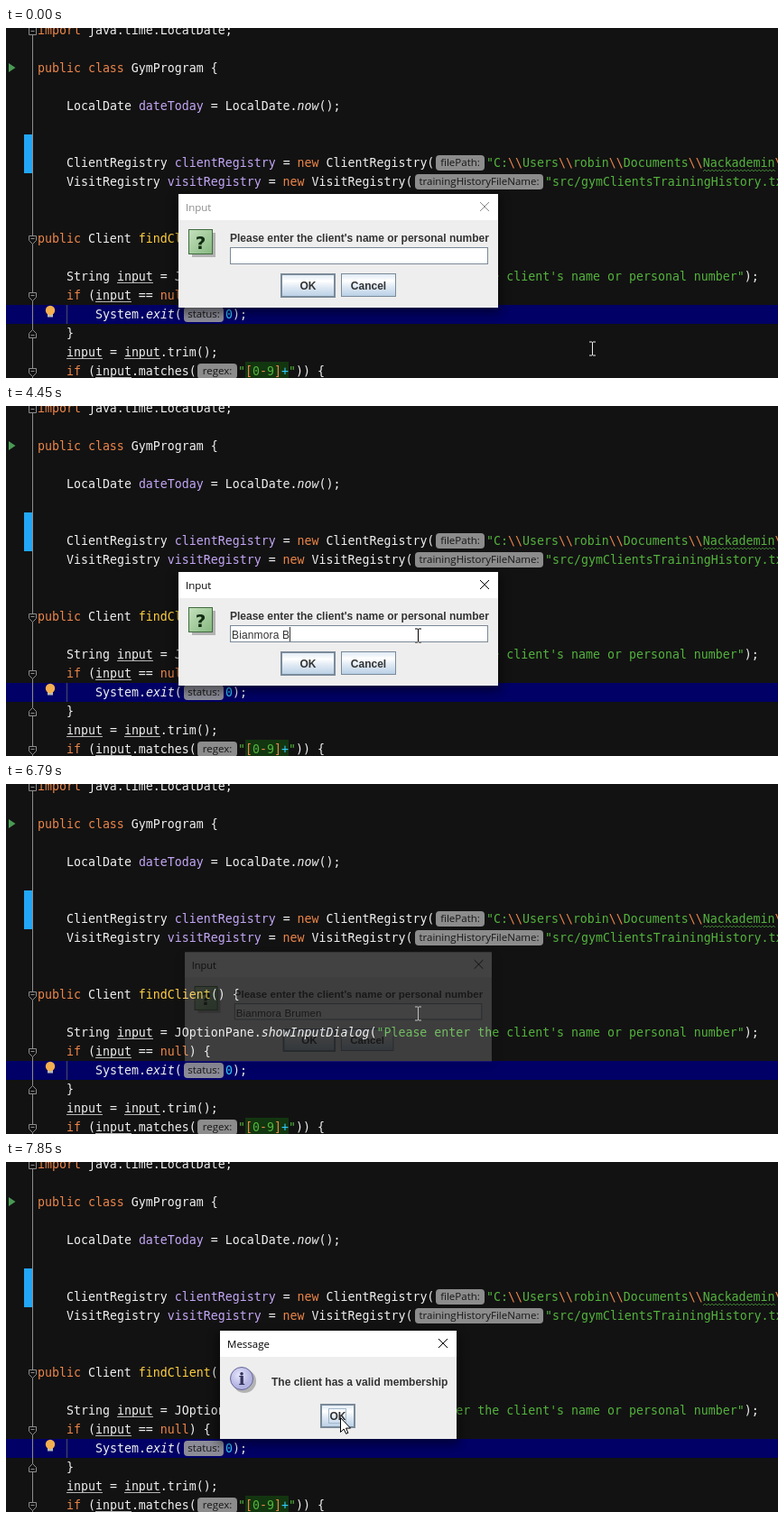
These frames come from a looping animation (855x388 px, 8 s). An HTML page:

```html
<!DOCTYPE html>
<html lang="en">
<head>
<meta charset="utf-8">
<title>Client lookup</title>
<style>
  html, body { margin: 0; width: 100%; height: 100%; overflow: hidden; background: #121212; }
  svg { display: block; isolation: isolate; }
  text { white-space: pre; }
  .code { font: 13.288px "DejaVu Sans Mono", monospace; fill: #f0f0f0; }
  .k { fill: #ed864a; }
  .s { fill: #54b33e; }
  .f { fill: #c3a6f5; }
  .m { fill: #ffcf40; }
  .n { fill: #33ccff; }
  .i { font-style: italic; }
  .hint { font: 11.5px "Open Sans", sans-serif; fill: #161616; }
  .title { font: 11.5px "Open Sans", sans-serif; }
  .bold { font: bold 12px "Liberation Sans", Arial, sans-serif; fill: #333; }
  .mid { text-anchor: middle; }
  .typed { font: 12px "Liberation Sans", Arial, sans-serif; letter-spacing: .15px; fill: #333; }
  .fold { fill: #121212; stroke: #8c8c8c; }
  .button { fill: url(#ocean); stroke: #7a8a99; }
  #beam { mix-blend-mode: difference; }
</style>
</head>
<body>
<svg width="855" height="388" viewBox="0 0 855 388">
  <defs>
    <linearGradient id="ocean" x2="0" y2="1">
      <stop offset="0" stop-color="#dde8f3"/>
      <stop offset=".3" stop-color="#fff"/>
      <stop offset=".55" stop-color="#e2ebf5"/>
      <stop offset="1" stop-color="#b8cfe5"/>
    </linearGradient>
    <linearGradient id="green" x2="1" y2="1">
      <stop offset="0" stop-color="#c4e0bc"/>
      <stop offset="1" stop-color="#86b880"/>
    </linearGradient>
    <radialGradient id="lilac" cx=".4" cy=".35">
      <stop offset="0" stop-color="#e6e6fc"/>
      <stop offset="1" stop-color="#b4b4e2"/>
    </radialGradient>
    <filter id="blur" x="-20%" y="-30%" width="140%" height="160%"><feGaussianBlur stdDeviation="6"/></filter>
  </defs>

  <rect width="855" height="388" fill="#121212"/>
  <rect y="307" width="855" height="21" fill="#000066"/>
  <path d="M67.5 307v21" stroke="#4a4a70"/>
  <rect x="265" y="370" width="48" height="18" fill="#12360f"/>
  <path d="M29.5 0v388" stroke="#8c8c8c"/>
  <rect x="20" y="118" width="9" height="43" fill="#22a7f7"/>
  <path d="M3 39l7.500 5l-7.500 5z" fill="#499c54"/>
  <g id="folds"></g>
  <path d="M46 317h6v3.500h-6z" fill="#b9b9b9"/>
  <circle cx="49" cy="313" r="5.200" fill="#f4af50"/>
  <g id="code"></g>

  <g id="ask">
    <rect x="188" y="187" width="360" height="129" opacity=".45" filter="url(#blur)"/>
    <rect x="191" y="184" width="354" height="126" fill="#eee"/>
    <rect x="191" y="184" width="354" height="29" fill="#fff"/>
    <g id="bar">
      <text class="title" x="199" y="203" fill="currentColor">Input</text>
      <path d="M525 193l10 10m0-10l-10 10" stroke="currentColor"/>
    </g>
    <path d="M206 227h26v27h-26z" fill="#999" opacity=".7"/>
    <rect x="202.500" y="223.500" width="26" height="27" fill="url(#green)" stroke="#3f6b3f"/>
    <text class="mid" x="215.500" y="245" font-family="DejaVu Sans, sans-serif" font-weight="bold" font-size="20" fill="#122c12">?</text>
    <text class="bold" x="248" y="237">Please enter the client's name or personal number</text>
    <rect x="248.500" y="243.500" width="285" height="18" fill="#fff" stroke="#7a8a99"/>
    <text class="typed" id="typed" x="250" y="258"></text>
    <rect id="caret" y="245" width="1" height="16" fill="#333"/>
    <rect class="button" x="305" y="273" width="59" height="25" stroke-width="2"/>
    <text class="bold mid" x="334.500" y="290">OK</text>
    <rect class="button" x="371.500" y="272.500" width="60" height="25"/>
    <text class="bold mid" x="401.500" y="290">Cancel</text>
  </g>

  <g id="msg">
    <rect x="234" y="190" width="268" height="123" opacity=".45" filter="url(#blur)"/>
    <rect x="237" y="187" width="262" height="120" fill="#eee"/>
    <rect x="237" y="187" width="262" height="29" fill="#fff"/>
    <text class="title" x="245" y="206">Message</text>
    <path d="M479 196l10 10m0-10l-10 10" stroke="#000"/>
    <circle cx="264" cy="243" r="13" fill="#999" opacity=".7"/>
    <circle cx="261" cy="240" r="12.500" fill="url(#lilac)" stroke="#666699"/>
    <text class="mid" x="261" y="247" font-family="DejaVu Serif, serif" font-weight="bold" font-size="19" fill="#33335c">i</text>
    <text class="bold" x="294" y="248">The client has a valid membership</text>
    <rect class="button" x="349" y="269" width="37" height="25" stroke-width="2"/>
    <rect x="357.500" y="273.500" width="19" height="16" fill="none" stroke="#a3b8cc"/>
    <text class="bold mid" x="367.500" y="286">OK</text>
  </g>

  <path id="beam" d="M-3.500-7.500h3l.5.5.5-.5h3M-3.500 7.500h3l.5-.5.5.5h3M0-7v14" transform="translate(456 254)" fill="none" stroke="#fff"/>
  <path id="arrow" d="M.5.5v16l3.700-3.500 2.500 5.300 2.200-1-2.400-5.200h5z" fill="#fff" stroke="#000"/>
</svg>

<script>
const $ = id => document.getElementById(id);
const LOOP = 8000;

// "~x" switches the style class of the text that follows it.
function line(y, x, src) {
  const spans = src.split('~').filter(Boolean)
    .map(p => `<tspan class="${p[0]}">${p.slice(1)}</tspan>`).join('');
  return `<text class="code" x="${x}" y="${y}">${spans}</text>`;
}
function hint(y, x, width, label, fill = '#8c8c8c') {
  return `<rect x="${x}" y="${y - 13}" width="${width}" height="17" rx="4" fill="${fill}"/>` +
    `<text class="hint mid" x="${x + width / 2}" y="${y - 1}">${label}</text>`;
}
const underline = (y, x) => `<path d="M${x} ${y + 2.5}h40" stroke="#b4b4b4"/>`;

$('code').innerHTML = [
  line(7, 35, '~kimport ~wjava.time.LocalDate;'),
  line(49, 35, '~kpublic class ~wGymProgram {'),
  line(91, 67, '~wLocalDate ~fdateToday ~w= LocalDate.~inow~w();'),
  line(154, 67, '~wClientRegistry ~fclientRegistry ~w= ~knew ~wClientRegistry('),
  hint(154, 476, 54, 'filePath:'),
  line(154, 532, '~s"C:~k\\\\~sUsers~k\\\\~srobin~k\\\\~sDocuments~k\\\\~sNackademin~k\\\\'),
  `<path d="M772 159${'l2-2l2 2'.repeat(20)}" fill="none" stroke="#4a9a3a" stroke-width=".8"/>`,
  line(175, 67, '~wVisitRegistry ~fvisitRegistry ~w= ~knew ~wVisitRegistry('),
  hint(175, 453, 142, 'trainingHistoryFileName:'),
  line(175, 597, '~s"src/gymClientsTrainingHistory.txt"'),
  line(238, 35, '~kpublic ~wClient ~mfindClient~w() {'),
  line(280, 67, '~wString input = JOptionPane.~ishowInputDialog~w(' +
    '~s"Please enter the client\'s name or personal number"~w);'),
  underline(280, 123),
  line(301, 67, '~kif ~w(input == ~knull~w) {'),
  underline(301, 99),
  line(322, 99, '~wSystem.~iexit~w('),
  hint(322, 197, 44, 'status:', '#8c8c98'),
  line(322, 243, '~n0~w);'),
  line(343, 67, '~w}'),
  line(364, 67, '~winput = input.trim();'),
  underline(364, 67), underline(364, 131),
  line(385, 67, '~kif ~w(input.matches('),
  underline(385, 99),
  hint(385, 212, 44, 'regex:'),
  line(385, 257, '~s"~k[~s0~k-~s9~k]~n+~s"~w)) {')
].join('');

const fold = (y, dir) =>
  `<path class="fold" d="M25.500 ${y - 4 * dir}h8v${5 * dir}l-4 ${4 * dir}l-4 ${-4 * dir}z"/>` +
  `<path class="fold" d="M27.500 ${y - dir}h4"/>`;
$('folds').innerHTML =
  '<path class="fold" d="M25.500-1.500h8v9h-8zM27.500 3.500h4"/>' +
  fold(234.5, 1) + fold(297.5, 1) + fold(339.5, -1) + fold(381.5, 1);

const NAME = 'Bianmora Brumen';
const KEYS = [1780, 2100, 2480, 2800, 3050, 3200, 3520, 3840, 3990, 4450, 4680, 5290, 5600, 5750, 5920];
const FOCUS = 770, BLINK = 460;

// time, opacity and scale of the prompt, opacity and scale of the message
const FADES = [
  [0, 1, 1, 0, 1],
  [6700, .65, .985, 0, 1],
  [6790, .2, .96, 0, 1],
  [6850, .04, .94, 0, 1],
  [6900, 0, 1, .25, .95],
  [6950, .6, .977].toSpliced ? [6950, 0, 1, .6, .977] : [6950, 0, 1, .6, .977],
  [7000, 0, 1, .86, .99],
  [7160, 0, 1, 1, 1]
];

const clamp = (v, lo, hi) => Math.min(hi, Math.max(lo, v));
const ease = p => p * p * (3 - 2 * p);
const mix = (a, b, p) => Math.round(a + (b - a) * p);
const stepped = (t, start, gap, n) => ease(clamp(Math.floor((t - start) / gap) + 1, 0, n) / n);
const within = (x, y, x0, y0, x1, y1) => x >= x0 && x < x1 && y >= y0 && y < y1;

function fade(el, opacity, scale) {
  el.setAttribute('opacity', opacity);
  el.setAttribute('transform', `translate(367.500 247) scale(${scale}) translate(-367.500 -247)`);
}

function drawTyping(t) {
  const hit = KEYS.filter(k => k <= t);
  const last = hit.length ? hit[hit.length - 1] : FOCUS;
  const typed = $('typed');
  typed.textContent = NAME.slice(0, hit.length);
  const width = hit.length ? typed.getComputedTextLength() : 0;
  $('caret').setAttribute('x', Math.round(250 + width));
  $('caret').setAttribute('visibility', t >= FOCUS && t - last < BLINK ? 'visible' : 'hidden');
  $('bar').setAttribute('color', t < 760 ? '#8a8a8a' : '#000');
}

function drawPointer(t) {
  let x, y, arrow;
  if (t < 6900) {
    const p = stepped(t, 70, 77, 8);
    x = mix(649, 456, p);
    y = mix(355, 254, p);
    arrow = within(x, y, 191, 184, 545, 310) && !within(x, y, 248, 243, 534, 262);
  } else {
    const p = stepped(t, 7700, 75, 3);
    x = mix(454, 370, p);
    y = mix(253, 283, p);
    arrow = true;
  }
  $('beam').setAttribute('transform', `translate(${x + .5} ${y + .5})`);
  $('arrow').setAttribute('transform', `translate(${x} ${y})`);
  $('beam').setAttribute('visibility', arrow ? 'hidden' : 'visible');
  $('arrow').setAttribute('visibility', arrow ? 'visible' : 'hidden');
}

const start = performance.now();
function draw() {
  const t = (performance.now() - start) % LOOP;
  const [, askOpacity, askScale, msgOpacity, msgScale] = FADES.filter(f => f[0] <= t).pop();
  fade($('ask'), askOpacity, askScale);
  fade($('msg'), msgOpacity, msgScale);
  drawTyping(t);
  drawPointer(t);
  requestAnimationFrame(draw);
}
draw();
</script>
</body>
</html>
```
